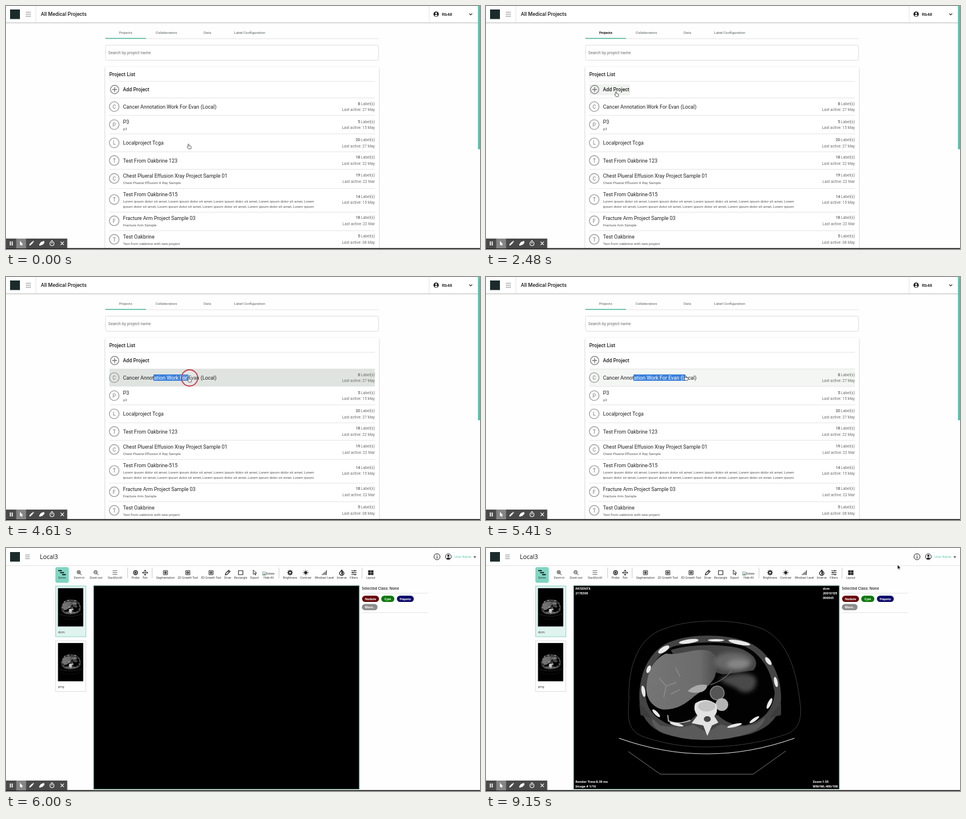
Recreate the animation shown at these times as an HTML page. Size 816x419 px, loop 9.85 s.

```html
<!DOCTYPE html>
<html lang="en">
<head>
<meta charset="utf-8">
<title>Medical projects</title>
<style>
html, body { margin: 0; width: 100%; height: 100%; overflow: hidden; background: #fdfefd; }
svg { display: block; width: 816px; height: 419px; }
text { font-family: Roboto, sans-serif; fill: #212121; white-space: pre; }
.title { font-size: 8.82px; }
.b { font-weight: 500; }
.tab { font-size: 6.2px; fill: #5c5f5d; text-anchor: middle; }
.sub { font-size: 6.15px; fill: #555; }
.meta { font-size: 6.6px; fill: #6d6f6e; text-anchor: end; }
.meta tspan { font-weight: 700; }
.letter { font-size: 8.8px; fill: #777; text-anchor: middle; }
.app text { font-family: "Noto Sans", "Open Sans", sans-serif; }
.app .tool { font-size: 4.85px; fill: #333; text-anchor: middle; }
.app .scan { font-size: 5.4px; font-weight: 700; fill: #fff; }
.app .pill { font-size: 5.3px; font-weight: 600; fill: #fff; text-anchor: middle; }
.app .name { font-size: 5.7px; fill: #333; }
.line { stroke: #e3e5e3; fill: none; }
.ico { fill: none; stroke: #222; }
.card { fill: #fff; filter: drop-shadow(0 1px 1.5px #0004); }

.anim { animation: 9.85s step-end infinite; }
#home { animation-name: home; }
#load { animation-name: load; }
#app { animation-name: app; }
#view { animation-name: view; }
#bar { animation-name: bar; }
#hover { animation-name: hover; }
#hand { animation-name: hand; }
#ring { animation-name: ring; }
#arrow { animation-name: arrow; }
#tab { animation-name: tab; }
.sel { animation-name: sel; }

@keyframes home { 0% { visibility: visible } 56.44%, 100% { visibility: hidden } }
@keyframes load { 0% { visibility: hidden } 56.44% { visibility: visible } 60.91%, 100% { visibility: hidden } }
@keyframes app { 0% { visibility: hidden } 60.91%, 100% { visibility: visible } }
@keyframes view { 0% { opacity: 0 } 62.43%, 100% { opacity: 1 } }
@keyframes bar { 0% { transform: none } 56.44% { transform: translate(-17.6px, 0) } 60.91%, 100% { transform: none } }
@keyframes tab { 0% { fill: #5c5f5d; stroke: none } 22.43% { fill: #222; stroke: #222 } 39.18%, 100% { fill: #5c5f5d; stroke: none } }
@keyframes ring { 0% { opacity: 0 } 42.17% { opacity: 1 } 51.26%, 100% { opacity: 0 } }
@keyframes hover {
  0% { opacity: 0; y: 221px; height: 30px; width: 457px; fill: #f4f6f4 }
  2.32% { opacity: 1; y: 252px; height: 29px }
  6.24% { y: 282px; height: 32px }
  10.16% { y: 315px; height: 40px }
  12.99% { y: 282px; height: 32px }
  14.34% { y: 252px; height: 29px }
  17.04% { y: 221px; height: 30px }
  18.38% { y: 189px; height: 31px }
  21.08% { y: 159px; height: 29px; width: 457px }
  22.43% { y: 135px; height: 19px; width: 70px; fill: #f1f3f1 }
  39.18% { y: 159px; height: 29px; width: 457px; fill: #f4f6f4 }
  42.17% { fill: #e0e4e1 }
  51.26%, 100% { opacity: 1; y: 159px; height: 29px; width: 457px; fill: #f4f6f4 }
}
@keyframes hand {
  0% { transform: translate(315.5px, 242px) }
  1.01% { transform: translate(315.5px, 242px); animation-timing-function: steps(9, jump-start) }
  12.78% { transform: translate(270px, 324px) }
  12.99% { transform: translate(270px, 324px); animation-timing-function: steps(8, jump-start) }
  23.75% { transform: translate(217px, 152px); animation-timing-function: steps(2, jump-start) }
  26.59% { transform: translate(225px, 152px) }
  28.01% { transform: translate(225px, 152px); animation-timing-function: steps(7, jump-start) }
  38.68% { transform: translate(256px, 177px) }
  43.65% { transform: translate(256px, 177px); animation-timing-function: steps(3, jump-start) }
  48.22% { transform: translate(316px, 177px); animation-timing-function: steps(3, jump-start) }
  52.79%, 100% { transform: translate(344.5px, 174px) }
}
@keyframes sel {
  0% { width: 0 }
  43.65% { width: 0; animation-timing-function: steps(3, jump-start) }
  48.22% { width: 60px; animation-timing-function: steps(3, jump-start) }
  52.79%, 100% { width: 89px }
}
@keyframes arrow {
  0% { opacity: 0; transform: translate(358px, 161px) }
  69.74% { opacity: 1; transform: translate(358px, 161px) }
  79.18% { opacity: 1; transform: translate(358px, 161px); animation-timing-function: steps(3, jump-start) }
  84.06% { opacity: 1; transform: translate(698px, 0) }
  90.05% { opacity: 1; transform: translate(702.5px, 1px) }
  92.89%, 100% { opacity: 1; transform: translate(708.5px, 29px) }
}
</style>
</head>
<body>
<svg viewBox="0 0 816 419" xmlns="http://www.w3.org/2000/svg">
<defs>
  <clipPath id="selClip"><rect class="anim sel" x="254" y="167" width="0" height="12"/></clipPath>
  <filter id="soft" x="-20%" y="-20%" width="140%" height="140%"><feGaussianBlur stdDeviation="3.5"/></filter>
  <filter id="edge"><feGaussianBlur stdDeviation=".6"/></filter>
  <linearGradient id="liver"><stop offset="0" stop-color="#757575"/><stop offset=".75" stop-color="#6c6c6c"/><stop offset="1" stop-color="#4c4c4c"/></linearGradient>
  <g id="ct">
    <path fill="none" stroke="#3c3c3c" d="M380 343C330 343 296 334 270 325C240 314 245 285 246 262C244 205 262 152 308 139C350 122 424 122 466 136C516 150 534 208 540 262C545 292 540 314 514 322C480 334 430 343 380 343Z"/>
    <g filter="url(#edge)">
      <path fill="#444" d="M264 258C264 212 284 172 322 160C356 148 408 148 444 160C484 172 508 214 508 258C508 284 494 306 462 318C430 332 332 332 302 318C276 306 264 284 264 258Z"/>
      <path fill="#020202" d="M275 256C274 214 292 184 322 170C356 161 410 160 444 169C476 183 492 214 497 250C494 276 482 293 456 303C434 311 413 301 399 288L362 288C350 301 334 309 312 303C288 291 277 276 275 256Z"/>
      <path fill="#3c3c3c" d="M264 268L277 281L284 293L266 288ZM508 268L496 281L488 293L508 288Z"/>
      <path fill="#444" d="M318 176C350 165 412 165 440 174C462 183 472 198 460 211L408 218L330 196Z"/>
      <path fill="url(#liver)" d="M276 240C278 209 292 189 310 182C336 186 362 170 386 178C404 188 398 207 394 222C388 236 372 246 358 256C342 271 322 281 302 278C285 273 275 258 276 240Z"/>
    </g>
    <g filter="url(#soft)">
      <ellipse cx="425" cy="196" rx="33" ry="16" fill="#666"/>
      <ellipse cx="434" cy="200" rx="19" ry="8" fill="#858585"/>
      <path fill="#484848" d="M402 226C425 214 458 212 465 226C467 246 452 252 438 247C428 237 412 237 402 226Z"/>
    </g>
    <g fill="none" stroke="#969696" stroke-width="1.5" opacity=".75" filter="url(#edge)">
      <path d="M298 224l12 14l-4 20M310 238l18-6M318 252l16-8M326 206l8 16"/>
      <path d="M386 236q24-8 36-24" stroke="#777"/>
    </g>
    <g filter="url(#edge)">
      <path fill="#aaa" d="M347 247Q360 233 380 236Q382 243 372 248Q358 252 347 247Z"/>
      <circle cx="398" cy="250" r="12" fill="#555" stroke="#888" stroke-width="1.5"/>
      <circle cx="406" cy="270" r="11" fill="#b4b4b4"/>
      <path fill="#5a5a5a" d="M286 294L300 306Q340 313 356 304L380 318L404 304Q430 313 466 303L480 292Q478 308 456 318Q418 332 380 331Q340 332 304 319Q284 308 286 294Z"/>
      <path fill="#e2e2e2" d="M360 268Q379 255 397 270Q400 283 393 290L400 301L389 306L381 324L374 306L354 302L364 289Q356 279 360 268Z"/>
      <ellipse cx="380" cy="273" rx="15" ry="9" fill="#c4c4c4"/>
      <ellipse cx="381" cy="295" rx="6" ry="5" fill="#454545"/>
      <path fill="none" stroke="#aaa" stroke-width="2" d="M313 288L314 298Q330 306 352 297"/>
      <g id="ribs" fill="#e8e8e8"/>
    </g>
    <g fill="none" stroke="#ddd" stroke-width="1.2">
      <path d="M229 328Q380 382 531 328"/>
      <path d="M245 351L300 390H460L516 350" stroke="#777" stroke-width="1"/>
    </g>
  </g>
</defs>
<rect width="816" height="419" fill="#fdfefd"/>

<g id="home" class="anim">
  <rect class="card" x="-3" y="-3" width="822" height="31"/>
  <rect x="7" y="6" width="17" height="16.5" fill="#1b2b2c"/>
  <path d="M34 10.8h9M34 14.2h9M34 17.6h9" stroke="#888"/>
  <path class="line" d="M51.5 0V28M728.5 0V28"/>
  <text class="title b" x="60" y="17.2">All Medical Projects</text>
  <circle cx="740.5" cy="14" r="4.6" fill="#222"/>
  <circle cx="740.5" cy="12.6" r="1.5" fill="#fff"/><path d="M737.8 16.4q2.7-2.6 5.4 0q-2.7 2.4-5.4 0" fill="#fff"/>
  <text class="b" x="750.3" y="16.8" font-size="7.72">Rb48</text>
  <path class="ico" d="M797.5 12.8l2.5 2.5l2.5-2.5" stroke-width="1.2"/>
  <text id="tab" class="tab anim" x="206" y="47.8" stroke-width=".25">Projects</text>
  <text class="tab" x="276" y="47.8">Collaborators</text>
  <text class="tab" x="346.7" y="47.8">Data</text>
  <text class="tab" x="419.4" y="47.8">Label Configuration</text>
  <path class="line" d="M171 56.5H642"/>
  <path d="M171 55.7H241" stroke="#54bda0" stroke-width="1.4"/>
  <rect class="line" x="171.5" y="67.5" width="470" height="26" rx="2" style="fill:#fff;stroke:#dcdedc"/>
  <text x="176" y="83.2" font-size="7.04" style="fill:#6b6d6c">Search by project name</text>
  <rect class="card" x="171" y="105" width="471" height="330" rx="2"/>
  <rect id="hover" class="anim" x="178" y="221" width="457" height="30"/>
  <text class="title b" x="177.7" y="121.2">Project List</text>
  <path class="line" d="M178 130H635M178 158.5H635"/>
  <circle class="ico" cx="187" cy="144" r="7.2" style="stroke:#8a8a8a" stroke-width="1.5"/>
  <path d="M182.8 144h8.4M187 139.8v8.4" stroke="#777" stroke-width="1.4"/>
  <text class="b" x="201.3" y="147.2" font-size="8.7">Add Project</text>
  <g id="rows"></g>
  <rect class="anim sel" x="254" y="168" width="0" height="11" fill="#3b80da"/>
  <text class="title" x="201.5" y="176.7" clip-path="url(#selClip)" style="fill:#fff">Cancer Annotation Work For Evan (Local)</text>
  <rect x="812.5" width="3.5" height="247" fill="#4fc5ad"/>
  <g id="hand" class="anim">
    <circle id="ring" class="anim" cy="-3" r="14" fill="#fff2" stroke="#c93f50" stroke-width="1.8"/>
    <path d="M-2.2-3.6q.9-1 1.8 0V-1l3.1.7q1 .3.8 1.4L2.8 4.2H-1.4L-3.6 1q.2-1 1.4-.2Z" fill="#fff" stroke="#333" stroke-width=".8"/>
  </g>
</g>

<g id="load" class="app anim">
  <g class="top"></g>
  <g id="toolsA"></g>
  <rect x="138" y="56" width="457" height="351.5"/>
  <path class="line" d="M595 68.5H711M595 74.5H711" opacity=".7"/>
</g>

<g id="app" class="app anim">
  <g class="top"></g>
  <text x="58.3" y="18.6" font-size="10.4" font-weight="500">Local3</text>
  <circle class="ico" cx="761.5" cy="15" r="5"/>
  <circle cx="761.5" cy="13.4" r="1.9" fill="#222"/><path d="M758 18.2q3.5-4 7 0q-3.5 2.5-7 0" fill="#222"/>
  <text x="772" y="17.2" font-size="5.5" style="fill:#55c8ae">User Name</text>
  <path d="M804.8 14.5h4.6l-2.3 2.6z" fill="#222"/>
  <rect x="85" y="33" width="23" height="27" rx="3" fill="#7fd6c2"/>
  <g id="toolsB"></g>
  <g id="thumbs"></g>
  <rect x="151.2" y="65.2" width="456.6" height="350.4" stroke="#1f5349"/>
  <g id="view" class="anim">
    <use href="#ct"/>
    <text class="scan" x="154" y="71.8">PATIENTX</text>
    <text class="scan" x="154" y="79.6">2178309</text>
    <text class="scan" x="580" y="71.8">dcm</text>
    <text class="scan" x="580" y="79.6">20010105</text>
    <text class="scan" x="580" y="87.6">000045</text>
    <text class="scan" x="154" y="405">Render Time:8.39 ms</text>
    <text class="scan" x="154" y="412.8">Image # 1/16</text>
    <text class="scan" x="562.5" y="405">Zoom:1.55</text>
    <text class="scan" x="562.5" y="412.8">WW/WL:400/108</text>
  </g>
  <text x="612.7" y="71.8" font-size="6.25" font-weight="700" style="fill:#444">Selected Class: None</text>
  <path class="line" d="M613 78H727M613 111.5H727"/>
  <g id="pills"></g>
  <path id="arrow" class="anim" d="M0 0V7.4L1.7 5.9L2.9 8.7L4.1 8.1L2.9 5.4H5.3Z" stroke="#fff" stroke-width=".5"/>
</g>

<path d="M0 418.3H816" stroke="#111" stroke-width="1.4"/>
<g id="bar" class="anim">
  <rect y="401" width="105.5" height="17" fill="#4a4a4a"/>
  <rect x="17.6" y="401" width="17" height="17" fill="#858585"/>
  <g fill="#fff">
    <path d="M6.6 406h1.7v7H6.6zM9.8 406h1.7v7H9.8z"/>
    <path d="M24 405v8l1.9-1.6l1.1 2.4l1.2-.6l-1.1-2.3h2.3z"/>
    <path d="M40 413l.6-2.4l4.7-4.7l1.8 1.8l-4.7 4.7zM45.8 405.4l.8-.7l1.8 1.8l-.8.7z"/>
    <path d="M57 411.5l3-4.5l5.5-2l.8 3l-3 3.5l-5.5 2z"/>
    <path d="M77.6 404h3v1h-3z"/>
  </g>
  <g fill="none" stroke="#fff" stroke-width="1.1">
    <circle cx="79.1" cy="409.8" r="3.5"/><path d="M79.1 407.6v2.4M94 406.5l5.6 5.6M99.6 406.5l-5.6 5.6"/>
  </g>
</g>
</svg>
<script>
const $ = id => document.getElementById(id);
const fill = (id, parts) => { $(id).innerHTML = parts.join(''); };
const txt = (cls, x, y, s) => `<text class="${cls}" x="${x}" y="${y}">${s}</text>`;
const ring = (x, y, r) => `M${x - r} ${y}a${r} ${r} 0 1 0 ${2 * r} 0a${r} ${r} 0 1 0 ${-2 * r} 0`;

// centre y, bottom line, labels, last active, title, sub lines
const lorem = 'Lorem ipsum dolor sit amet, ';
const rows = [
  [173.5, 188.5, 8, '27 May', 'Cancer Annotation Work For Evan (Local)'],
  [204.5, 220.5, 5, '15 May', 'P3', 'p3'],
  [236, 251.5, 20, '27 May', 'Localproject Tcga'],
  [266.3, 281.5, 18, '22 May', 'Test From Oakbrine 123'],
  [297.3, 314.5, 19, '22 Mar', 'Chest Plueral Effusion Xray Project Sample 01', 'Chest Plueral Effusion X Ray Sample'],
  [333.7, 355.5, 14, '15 May', 'Test From Oakbrine-515', lorem.repeat(4) + 'Lorem',
    'ipsum dolor sit amet, ' + lorem.repeat(3) + 'Lorem ipsum'],
  [370.3, 387.5, 18, '22 Mar', 'Fracture Arm Project Sample 03', 'Fracture Arm Sample'],
  [402.3, 430, 5, '08 May', 'Test Oakbrine', 'Test from oakbrine with new project']
];
fill('rows', rows.map(([y, end, n, date, title, ...subs]) => {
  const top = y + 3.2 - 4.3 * subs.length;
  return `<circle class="ico" cx="186.3" cy="${y}" r="8.3" style="stroke:#999" stroke-width="1.3"/>`
    + txt('letter', 186.3, y + 3.2, title[0]) + txt('title', 201.5, top, title)
    + subs.map((s, i) => txt('sub', 201.5, top + 10.6 + 8.6 * i, s)).join('')
    + txt('meta', 635, y - 2.9, `<tspan>${n}</tspan> Label(s)`)
    + txt('meta', 635, y + 7.6, 'Last active: ' + date)
    + `<path class="line" d="M178 ${end}H635"/>`;
}));

const lens = ring(-.8, -.8, 2.8) + 'M1.2 1.2L4 4M-2.2-.8h2.8';
const dashed = 'M-3.5-3.5h7v7h-7zM-1.5-1.5h3v3h-3zM0-1.5v3';
const rays = (a, b) => Array.from({ length: 8 }, (_, i) => {
  const c = Math.cos(i * Math.PI / 4), s = Math.sin(i * Math.PI / 4);
  return `M${c * a} ${s * a}L${c * b} ${s * b}`;
}).join('');
// label, x while loading, x when ready, path, line width, filled
const tools = [
  ['Series', 95, 96.5, 'M-6.5-3.5h6M-3.5 0h7M0 3.5h6.5', 2],
  ['Zoom in', 117.5, 126, lens + 'M-.8-2.2v2.8', 1],
  ['Zoom out', 145, 155, lens, 1],
  ['StackScroll', 177, 187.5, 'M-4-3.2h8M-4 0h8M-4 3.2h8', .7],
  ['Probe', 213.5, 223, ring(0, 0, 3.5) + ring(0, 0, 1.2), 1.4],
  ['Pan', 229, 239.5, 'M0-5l1.8 2.5h-3.6zM0 5l1.8-2.5h-3.6zM-5 0l2.5 1.8v-3.6zM5 0l-2.5 1.8v-3.6zM-1-1h2v2h-2z', .3, 1],
  ['Segmentation', 266.5, 274.5, dashed, 1],
  ['2D Growth Tool', 312.5, 313, dashed, 1],
  ['3D Growth Tool', 361, 353, dashed, 1],
  ['Draw', 393, 381.5, 'M-4 4l.8-3L2-4.2L4.2-2L-1 3.2zM.5-2.7L2.7-.5', 1.2],
  ['Rectangle', 417.5, 404, 'M-3.8-3.5h7.6v7h-7.6z', 1.1],
  ['Export', 443, 428, 'M-2.3-4.5v7.6l2-1.8l1.4 3l1.2-.6l-1.4-2.8h2.6z', .9],
  ['Hide All', 457, 452, '', 1],
  ['Brightness', 506.5, 489, ring(0, 0, 2.4) + rays(2.4, 4.8), 1.7],
  ['Contrast', 536.5, 516, ring(0, 0, 2.3) + rays(3.4, 4.8), 1, 1],
  ['Window/ Level', 573, 548, 'M-3.5 4V2.2M-1.2 4V.6M1.2 4V-1.5M3.5 4V-4', 1.2],
  ['Inverse', 607.5, 578, 'M0-4.5L2.8-1.2A3.6 3.6 0 1 1-2.8-1.2ZM0-3.5V3.5M1.2-1.5V3', 1.3],
  ['Filters', 628.5, 599, 'M-4.5-3.2h9M-4.5 0h9M-4.5 3.2h9M1.5-4.7v3M-1.8-1.5v3M2 1.7v3', 1.1],
  ['Layout', 657.5, 628, 'M-4.5-4h4.2v3.7h-4.2zM.3-4h4.2v3.7h-4.2zM-4.5.3h4.2v3.7h-4.2zM.3.3h4.2v3.7h-4.2z', .1, 1]
];
const icon = (x, y, d, w, solid) =>
  `<path class="ico" transform="translate(${x} ${y})" d="${d}" stroke-width="${w}"${solid ? ' style="fill:#222"' : ''}/>`;
const broken = (x, y) => `<g transform="translate(${x} ${y})"><path d="M-3-3h5l1 1v5h-6z" fill="#dbe6f5" stroke="#888" stroke-width=".6"/><path d="M-2.6 2.6L0 0l2.6 2.6z" fill="#4a9a45"/></g>`;
const bars = (xs, y) => xs.map(x => `<path class="line" style="stroke:#ccc" d="M${x} ${y}v18"/>`).join('');

fill('toolsA', [...tools.map(([, x, , d, w, f]) => icon(x, 37.7, d, w, f)), broken(457, 39.5), bars([199.5, 240, 486, 643], 34)]);
fill('toolsB', [...tools.map(([s, , x, d, w, f]) => icon(x, 42.5, d, w, f) + txt('tool', x, 52.8, s)),
  broken(444.5, 44), txt('tool', 455, 45.8, 'Delete'), bars([209.5, 251.5, 470, 613], 34)]);

document.querySelectorAll('.top').forEach((g, i) => {
  const x = i ? 742 : 738.5;
  g.innerHTML = `<rect x="7" y="7" width="17" height="16.5" fill="#1b2b2c"/>
    <path d="M33 12h8M33 15.2h8M33 18.4h8" stroke="#888"/><path class="line" d="M0 30.5H816"/>
    <circle class="ico" cx="${x}" cy="15" r="5.2"/><path d="M${x} 14v4M${x} 12v1.2" stroke="#222" stroke-width="1.1"/>`;
});

fill('thumbs', [['dcm', 65, '#e0f4ef', '#8ed5c5'], ['png', 159.5, '#fff', '#ddd']].map(([s, y, bg, edge]) =>
  `<rect x="85.5" y="${y + .5}" width="52" height="87.5" fill="${bg}" stroke="${edge}"/>
   <rect x="89.5" y="${y + 4.3}" width="43.5" height="66"/>
   <use href="#ct" transform="translate(111.7 ${y + 38}) scale(.135 .14) translate(-384 -250)"/>`
  + txt('name', 89.5, y + 81.8, s)));

fill('pills', [['Nodule', 613, 82.3, 29, '#650808'], ['Cyst', 646, 82.3, 22.5, '#0a790a'],
  ['Hepato', 673, 82.3, 29, '#08086a'], ['More..', 612.7, 96.6, 27, '#8c8c8c']].map(([s, x, y, w, c]) =>
  `<rect x="${x}" y="${y}" width="${w}" height="10.7" rx="5.3" fill="${c}"/>` + txt('pill', x + w / 2, y + 7.2, s)));

fill('ribs', [[306, 175, 11, 4.5, -32], [349, 161, 17, 3.6, -8], [396, 159, 14, 2, 0], [436, 163, 19, 3.6, 11],
  [486, 195, 8, 3.5, 52], [280, 209, 7, 3.2, -68], [271, 247, 10, 3.2, 80], [499, 231, 9, 3, 78],
  [488, 268, 10, 3, -65], [293, 285, 9, 2.8, 45], [328, 304, 12, 2.6, 14], [428, 306, 13, 2.6, -14], [462, 296, 10, 2.6, -34]
].map(([x, y, a, b, r]) => `<ellipse rx="${a}" ry="${b}" transform="translate(${x} ${y}) rotate(${r})"/>`));
</script>
</body>
</html>
```
